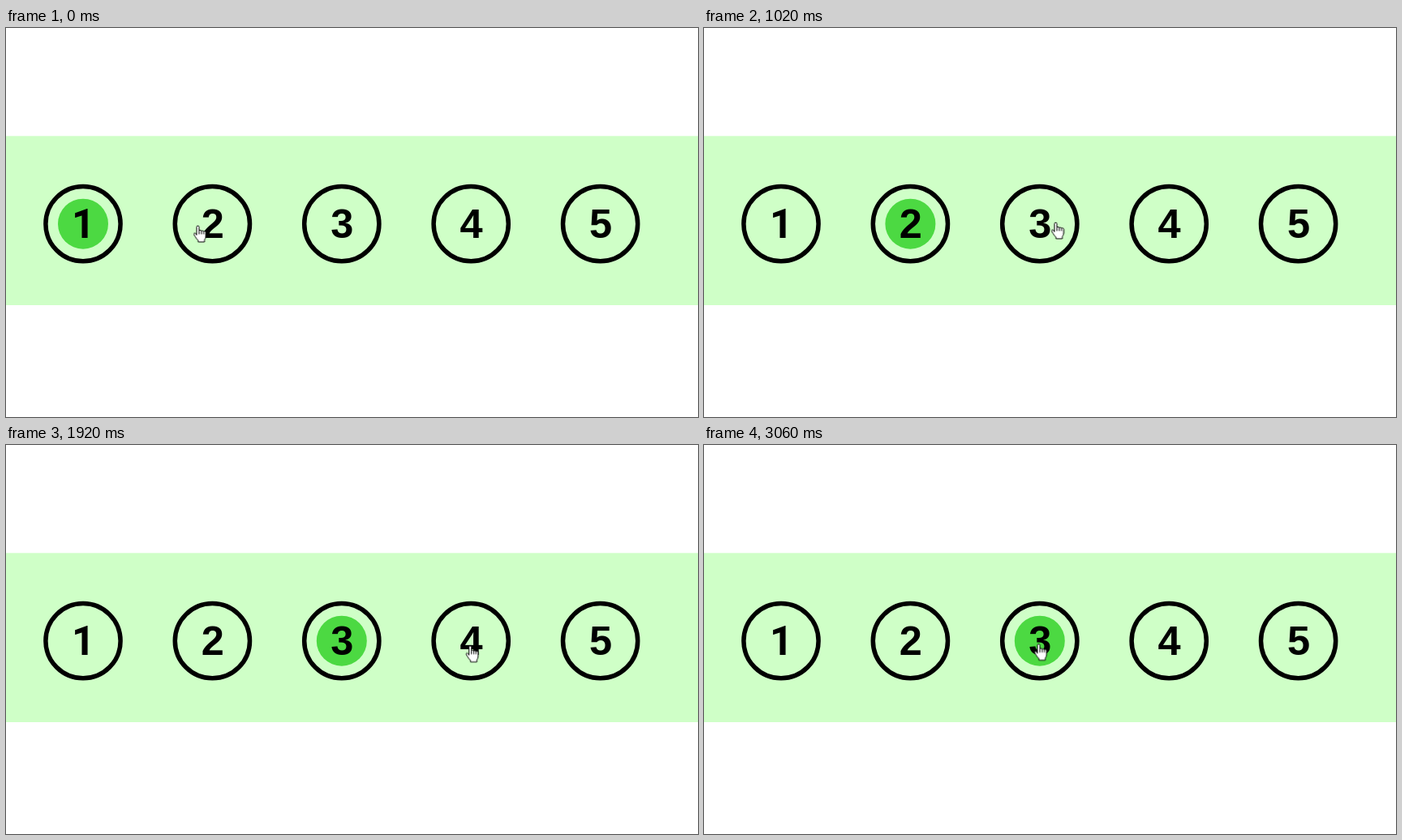
An HTML page that plays this animation: 853x480 px, repeating every 3190 ms.

```html
<!DOCTYPE html>
<html lang="en">
<head>
<meta charset="utf-8">
<title>Radio buttons</title>
<style>
  html, body { margin: 0; width: 100%; height: 100%; overflow: hidden; background: #fff; }
  svg { display: block; width: 853px; height: 480px; }
  .ring { fill: none; stroke: #000; stroke-width: 5.5; }
  .dot { fill: #4cd942; transform-box: fill-box; transform-origin: center; }
  text { font: bold 50.5px "Liberation Sans", Arial, sans-serif; text-anchor: middle; }
  /* a face whose 1 has no foot */
  text:first-of-type { font: bold 50px Roboto, sans-serif; }
  .hand { fill: #fff; stroke: #000; stroke-linejoin: round; }
</style>
</head>
<body>
<svg viewBox="0 0 853 480">
  <rect y="133.3" width="853" height="208.7" fill="#cfffc7"/>
  <g id="buttons"></g>
  <g id="cursor" class="hand">
    <path d="M-1.5 11.5V1.6a1.5 1.5 0 0 1 3 0V6.5q0-1 1.4-1t1.4 1.3q.2-.8 1.4-.8t1.4 1.4q.2-.7 1.2-.7 1.5 0 1.5 1.8V13q0 2.5-1.6 4.5V20H.3V18q-2.2-2-3.4-4.3l-1.7-2.8q-.6-1.4.6-1.9 1-.2 1.8.9z"/>
    <path fill="none" d="M1.5 6.5v4M4.3 6.8v3.7M7.1 7.4v3.1"/>
  </g>
</svg>
<script>
  const LOOP = 3190, STEP = 60, LAST = 3060, FADE = 300;
  const COUNT = 5, FIRST_X = 95, GAP = 159.4, Y = 241.7;

  const clicks = [
    { time: 370, pick: 2 },
    { time: 1100, pick: 3 },
    { time: 1990, pick: 4 },
    { time: 2690, pick: 3 }
  ];

  // where the fingertip slows down
  const stops = [
    { time: 0, x: 236.5, y: 244 },
    { time: 540, x: 405.5, y: 239 },
    { time: 1020, x: 433.5, y: 240 },
    { time: 1560, x: 606.5, y: 247 },
    { time: 2160, x: 555.5, y: 248 },
    { time: 2640, x: 412.5, y: 245.5 },
    { time: LOOP, x: 412.5, y: 245.5 }
  ];

  const buttons = document.getElementById("buttons");
  const anims = [];

  function add(tag, attrs, text = "") {
    const el = document.createElementNS("http://www.w3.org/2000/svg", tag);
    for (const key in attrs) el.setAttribute(key, attrs[key]);
    el.textContent = text;
    buttons.append(el);
    return el;
  }

  function track(el, frames) {
    const anim = el.animate(frames, { duration: LOOP, fill: "both" });
    anim.pause();
    anims.push(anim);
  }

  // each click eases the old dot out and the new one in
  function dotFrames(n) {
    let size = n === 1 ? 1 : 0;
    const key = (time, easing) =>
      ({ offset: time / LOOP, transform: `scale(${size})`, easing });
    const frames = [key(0, "linear")];
    for (const { time, pick } of clicks) {
      frames.push(key(time, "ease"));
      size = pick === n ? 1 : 0;
      frames.push(key(time + FADE, "linear"));
    }
    frames.push(key(LOOP, "linear"));
    return frames;
  }

  for (let n = 1; n <= COUNT; n++) {
    const cx = FIRST_X + (n - 1) * GAP;
    add("circle", { class: "ring", cx, cy: Y, r: 46.1 });
    track(add("circle", { class: "dot", cx, cy: Y, r: 31 }), dotFrames(n));
    add("text", { x: cx + 0.4, y: 259.2 }, n);
  }

  track(document.getElementById("cursor"), stops.map(({ time, x, y }) => ({
    offset: time / LOOP,
    transform: `translate(${x}px, ${y}px)`,
    easing: "cubic-bezier(.7, 0, .4, 1)"
  })));

  const start = performance.now();
  function draw() {
    const time = (performance.now() - start) % LOOP;
    const shown = Math.min(Math.floor(time / STEP) * STEP, LAST);
    for (const anim of anims) anim.currentTime = shown;
    requestAnimationFrame(draw);
  }
  draw();
</script>
</body>
</html>
```
